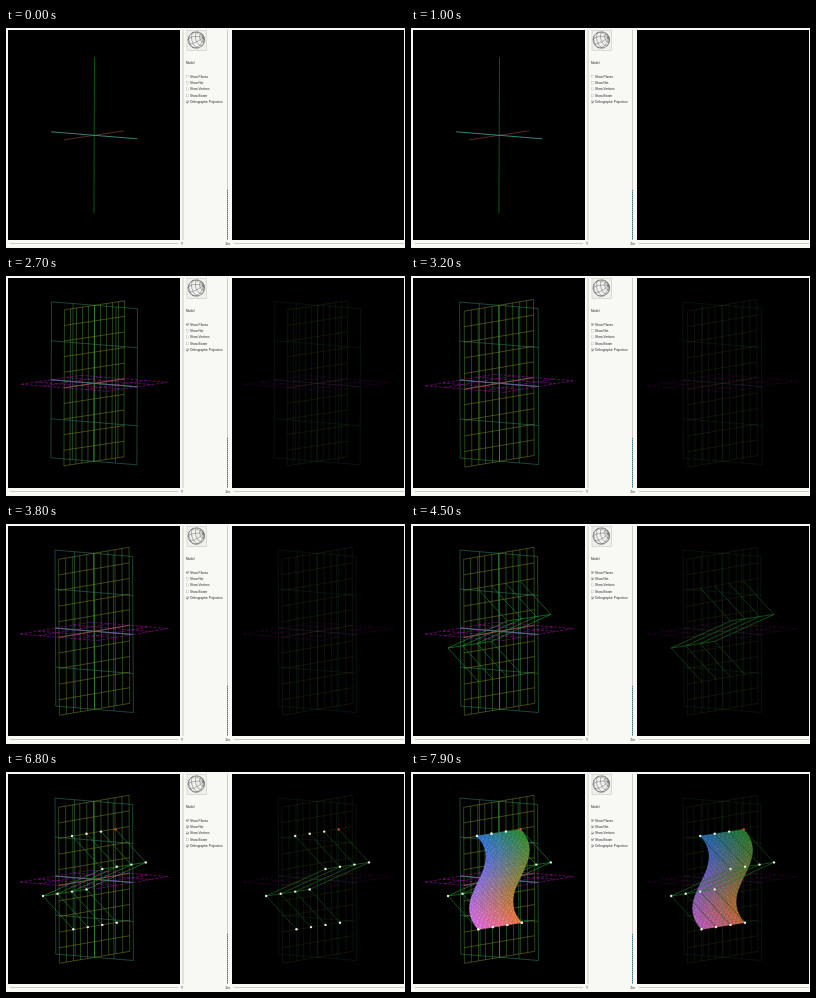
An HTML page with a canvas that plays this animation: 399 by 220 pixels, repeating every 8000 ms.

```html
<!DOCTYPE html>
<html lang="en">
<head>
<meta charset="utf-8">
<title>Surface viewer</title>
<style>
  html, body { margin: 0; width: 100%; height: 100%; overflow: hidden; background: #f8f9f4; }
  canvas, svg { position: absolute; left: 0; top: 0; width: 399px; height: 220px; }
  text { font-family: "Liberation Sans", Arial, sans-serif; font-size: 3.1px; fill: #222; }
  .box { fill: #fff; stroke: #aaa; stroke-width: .35; }
  .tick { fill: none; stroke: #333; stroke-width: .7; }
  .rule { stroke: #c0c1bc; stroke-width: .8; }
</style>
</head>
<body>
<canvas id="view"></canvas>
<svg viewBox="0 0 399 220">
  <path class="rule" d="M177 2V212M221.5 2V162M4 215.5H172M228 215.5H398"/>
  <path d="M221.5 162V212" stroke="#3f7288" stroke-dasharray="1.5 .5"/>
  <text x="175" y="217">Y</text>
  <text x="219.5" y="217">Zm</text>
  <text x="180" y="35.7">Model</text>
  <g id="options"></g>
</svg>
<script>
const LOOP = 8000;
const SHOW = { planes: 1300, net: 4000, vertices: 5200, surface: 7100 };
const TURN = { start: 2800, end: 3400 };
const OPTIONS = [
  ['Show Planes', SHOW.planes], ['Show Net', SHOW.net], ['Show Vertices', SHOW.vertices],
  ['Show Bezier', SHOW.surface], ['Orthographic Projection', 0]
];
const canvas = document.getElementById('view');
const ctx = canvas.getContext('2d');
const ratio = Math.max(1, window.devicePixelRatio || 1);
canvas.width = 399 * ratio;
canvas.height = 220 * ratio;

const optionsGroup = document.getElementById('options');
optionsGroup.innerHTML = OPTIONS.map(([label], i) => {
  const y = 48.6 + i * 6.35;
  return `<rect class="box" x="180.2" y="${y - 1.4}" width="2.6" height="2.6"/>
    <path class="tick" d="M180.6 ${y - .1}l.7 .8 1.2 -1.7"/>
    <text x="184" y="${y + 1.1}">${label}</text>`;
}).join('');
const ticks = [...optionsGroup.querySelectorAll('.tick')];

const mix = (a, b, t) => a + (b - a) * t;
const mixAll = (p, q, t) => p.map((n, i) => mix(n, q[i], t));

// Screen vectors of the three axes, before and after the turn
const START = [[43, 3.5], [.3, -78], [30, -4.5]];
const FINISH = [[38.8, 3.2], [-.4, -78], [35.2, -6]];

function projector(turn) {
  const axes = START.map((v, i) => mixAll(v, FINISH[i], turn));
  return (...p) => [0, 1].map(k => [88.2, 107.3][k] + p.reduce((sum, n, i) => sum + n * axes[i][k], 0));
}

function polyline(points, color, width = .6) {
  ctx.beginPath();
  points.forEach(p => ctx.lineTo(...p));
  ctx.strokeStyle = color;
  ctx.lineWidth = width;
  ctx.stroke();
}

function grid(at, columns, rows, columnColor, rowColor) {
  for (let i = 0; i <= columns; i++) {
    const u = i / columns * 2 - 1;
    polyline([at(u, -1), at(u, 1)], columnColor, .5);
  }
  for (let j = 0; j <= rows; j++) {
    const v = j / rows * 2 - 1;
    polyline([at(-1, v), at(1, v)], rowColor, .5);
  }
}

function drawAxes(project) {
  polyline([project(0, -1, 0), project(0, 1, 0)], '#0f7a1c', .7);
  polyline([project(0, 0, -1), project(0, 0, 1)], '#7e3a30', .7);
  polyline([project(-1, 0, 0), project(1, 0, 0)], '#3fa596', .8);
}

function drawPlanes(project, alpha) {
  ctx.globalAlpha = alpha;
  grid((u, v) => project(u, v, 0), 4, 4, '#2f8a66', '#2f8a72');
  grid((u, v) => project(0, v, u), 10, 10, '#4c8a2c', '#858a26');
  ctx.setLineDash([3, 1.5]);
  grid((u, v) => project(u, 0, v), 4, 4, '#b010b8', '#b010b8');
  ctx.setLineDash([]);
  ctx.globalAlpha = 1;
}

// Control points: four rows sharing one step to the right
const ROWS = [[66, 64], [96.3, 97], [37, 124], [67.3, 157.3]];
const STEP = [14.5, -2.2];
const control = (row, col) => ROWS[row].map((n, k) => n + STEP[k] * col);
const indices = [0, 1, 2, 3];

function drawNet(bright, dim) {
  indices.forEach(col => {
    polyline([control(0, col), control(1, col)], dim);
    polyline([control(1, col), control(2, col)], bright);
    polyline([control(2, col), control(3, col)], dim);
  });
  [1, 2].forEach(row => polyline([control(row, 0), control(row, 3)], bright));
}

function drawVertices(rows) {
  rows.forEach(row => indices.forEach(col => {
    ctx.fillStyle = row === 0 && col === 3 ? '#d0483c' : '#e8ece4';
    ctx.beginPath();
    ctx.arc(...control(row, col), 1.2, 0, 7);
    ctx.fill();
  }));
}

function surfacePoint(u, v) {
  const w = 1 - v;
  const weights = [w ** 3, 3 * w * w * v, 3 * w * v * v, v ** 3];
  return [0, 1].map(k => weights.reduce((s, b, i) => s + b * ROWS[i][k], 0) + STEP[k] * 3 * u);
}

const CORNERS = [[[48, 122, 225], [42, 150, 48]], [[238, 112, 240], [246, 126, 66]]];
function surfaceColor(u, v, light) {
  const [top, bottom] = CORNERS.map(([left, right]) => mixAll(left, right, u));
  return `rgb(${mixAll(top, bottom, v).map(n => Math.round(n * light))})`;
}

function drawSurface(brightness) {
  const across = 20, down = 44;
  for (let j = 0; j < down; j++) {
    for (let i = 0; i < across; i++) {
      const [u0, u1, v0, v1] = [i / across, (i + 1) / across, j / down, (j + 1) / down];
      const light = brightness * ((i + j) % 2 ? .94 : 1.06);
      ctx.fillStyle = ctx.strokeStyle = surfaceColor((u0 + u1) / 2, (v0 + v1) / 2, light);
      ctx.lineWidth = .3;
      ctx.beginPath();
      [[u0, v0], [u1, v0], [u1, v1], [u0, v1]].forEach(p => ctx.lineTo(...surfacePoint(...p)));
      ctx.closePath();
      ctx.fill();
      ctx.stroke();
    }
  }
}

function drawGlobe(turn) {
  const [cx, cy, r, tilt, lean] = [190.3, 12, 8.2, .55, 1.25];
  ctx.fillStyle = '#f0f1ec';
  ctx.fillRect(181, 2.5, 19.5, 20);
  ctx.strokeStyle = '#c8c9c4';
  ctx.lineWidth = .6;
  ctx.strokeRect(181, 2.5, 19.5, 20);
  ctx.save();
  ctx.translate(cx, cy);
  ctx.rotate(lean);
  ctx.strokeStyle = '#555';
  ctx.lineWidth = .5;
  ctx.beginPath();
  ctx.arc(0, 0, r, 0, 7);
  ctx.stroke();

  const curve = at => {
    let front = [];
    const flush = () => { polyline(front, '#555', .4); front = []; };
    for (let i = 0; i <= 48; i++) {
      const [lat, lon] = at(i / 48);
      const x = Math.cos(lat) * Math.sin(lon), y = Math.sin(lat), z = Math.cos(lat) * Math.cos(lon);
      const depth = z * Math.cos(tilt) + y * Math.sin(tilt);
      if (depth < 0) { flush(); continue; }
      front.push([r * x, -r * (y * Math.cos(tilt) - z * Math.sin(tilt))]);
    }
    flush();
  };
  const spin = .25 + turn * .13;
  for (let i = 0; i < 8; i++) curve(t => [(t - .5) * Math.PI, spin + i * Math.PI / 4]);
  for (let i = -2; i <= 2; i++) curve(t => [i * Math.PI / 6, Math.PI * (2 * t - 1)]);
  ctx.restore();
}

function drawLeft(time, project) {
  drawAxes(project);
  if (time >= SHOW.planes) drawPlanes(project, 1);
  if (time >= SHOW.net) drawNet('#22a030', '#1f8a34');
  if (time >= SHOW.vertices) drawVertices(indices);
  if (time >= SHOW.surface) {
    drawSurface(1);
    drawVertices([0, 3]);
  }
}

function drawRight(time, project) {
  if (time >= SHOW.surface) drawSurface(.85);
  if (time >= SHOW.planes) drawPlanes(project, .27);
  if (time >= SHOW.net) drawNet('#1c7a20', '#12521a');
  if (time >= SHOW.vertices) drawVertices(indices);
}

function frame(now) {
  const time = now % LOOP;
  const turn = Math.min(1, Math.max(0, (time - TURN.start) / (TURN.end - TURN.start)));
  const eased = 1 - (1 - turn) ** 2;
  const project = projector(eased);
  ctx.setTransform(ratio, 0, 0, ratio, 0, 0);
  ctx.clearRect(0, 0, 399, 220);
  ctx.fillStyle = '#000';
  ctx.fillRect(2, 2, 172, 210);
  ctx.fillRect(226, 2, 172, 210);
  drawGlobe(eased);
  drawLeft(time, project);
  ctx.translate(223.2, 0);
  drawRight(time, project);
  ticks.forEach((tick, i) => { tick.style.opacity = time >= OPTIONS[i][1] ? 1 : 0; });
  requestAnimationFrame(frame);
}
frame(0);
</script>
</body>
</html>
```
